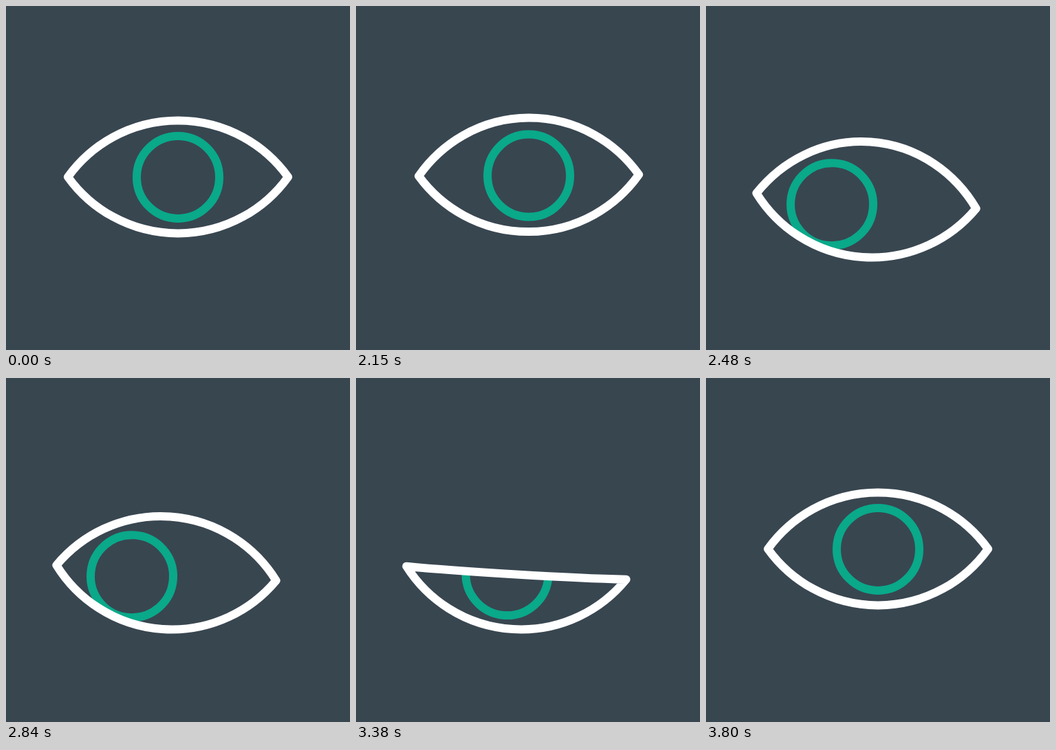
Animation of 500x500 px, one loop 3.89 s. Source, as an HTML page:

```html
<!DOCTYPE html>
<html lang="en">
<head>
<meta charset="utf-8">
<title>Blinking eye</title>
<style>
  html, body { margin: 0; width: 100%; height: 100%; overflow: hidden; background: #384650; }
  svg { display: block; width: 100vw; height: 100vh; }
  path, circle { fill: none; stroke-width: 12; stroke-linejoin: round; }
</style>
</head>
<body>
<svg viewBox="0 0 500 500">
  <defs><clipPath id="opening"><path id="hole"/></clipPath></defs>
  <g id="eye">
    <g clip-path="url(#opening)"><circle id="iris" r="60" stroke="#09a98a"/></g>
    <path id="lids" stroke="#fff"/>
  </g>
</svg>
<script>
const LOOP = 3890, START = 2030, END = 3800, STEP = 30;
const HALF = 160, SAG = 82;
const RADIUS = (HALF * HALF + SAG * SAG) / (2 * SAG);

// Easing
const backIn = s => u => (s + 1) * u ** 3 - s * u * u;
const flip = ease => u => 1 - ease(1 - u);
const smooth = u => u * u * (3 - 2 * u);
const strongBack = backIn(1.7), lidClose = backIn(1.2), lidOpen = flip(backIn(0.8));

// Each track: [start ms, end ms, from, to, easing]
const lid = [
  [2002, 2281, -1, 1, lidClose],
  [2281, 2562, 1, -1, lidOpen],
  [3139, 3419, -1, 1, lidClose],
  [3419, 3700, 1, -1, lidOpen]
];
const shift = [
  [1985, 2287, 0, 1, strongBack],
  [3470, 3800, 1, 0, flip(strongBack)]
];
const tilt = [
  [1985, 2338, 0, 4, strongBack],
  [3122, 3475, 4, 0, strongBack]
];
const gaze = [
  [2258, 2470, 0, 1, smooth],
  [3205, 3470, 1, 0, smooth]
];

function valueAt(track, t) {
  let value = track[0][2];
  for (const [start, end, from, to, ease] of track) {
    if (t < start) break;
    value = t >= end ? to : from + (to - from) * ease((t - start) / (end - start));
  }
  return value;
}

// Lid curve to the other corner: a circular arc squashed by bend (-1 up, 1 down)
function arc(bend, toX) {
  if (Math.abs(bend) < 0.002) return `L${toX} 0`;
  const sweep = (bend < 0) === (toX > 0) ? 1 : 0;
  return `A${RADIUS} ${RADIUS * Math.abs(bend)} 0 0 ${sweep} ${toX} 0`;
}

const [eye, iris, lids, hole] = ["eye", "iris", "lids", "hole"].map(id => document.getElementById(id));

function draw(t) {
  const p = valueAt(shift, t), g = valueAt(gaze, t);
  const shape = `M${-HALF} 0${arc(valueAt(lid, t), HALF)}${arc(1, -HALF)}Z`;
  lids.setAttribute("d", shape);
  hole.setAttribute("d", shape);
  iris.setAttribute("cx", -49.5 * g);
  iris.setAttribute("cy", 0.5 + 8 * g);
  eye.setAttribute("transform",
    `translate(${250 - 17 * p} ${248.4 + 34.8 * p}) rotate(${valueAt(tilt, t)})`);
}

function frame() {
  const t = performance.now() % LOOP;
  const moving = t >= START && t < END;
  draw(moving ? START + Math.floor((t - START) / STEP) * STEP : 0);
  requestAnimationFrame(frame);
}
frame();
</script>
</body>
</html>
```
